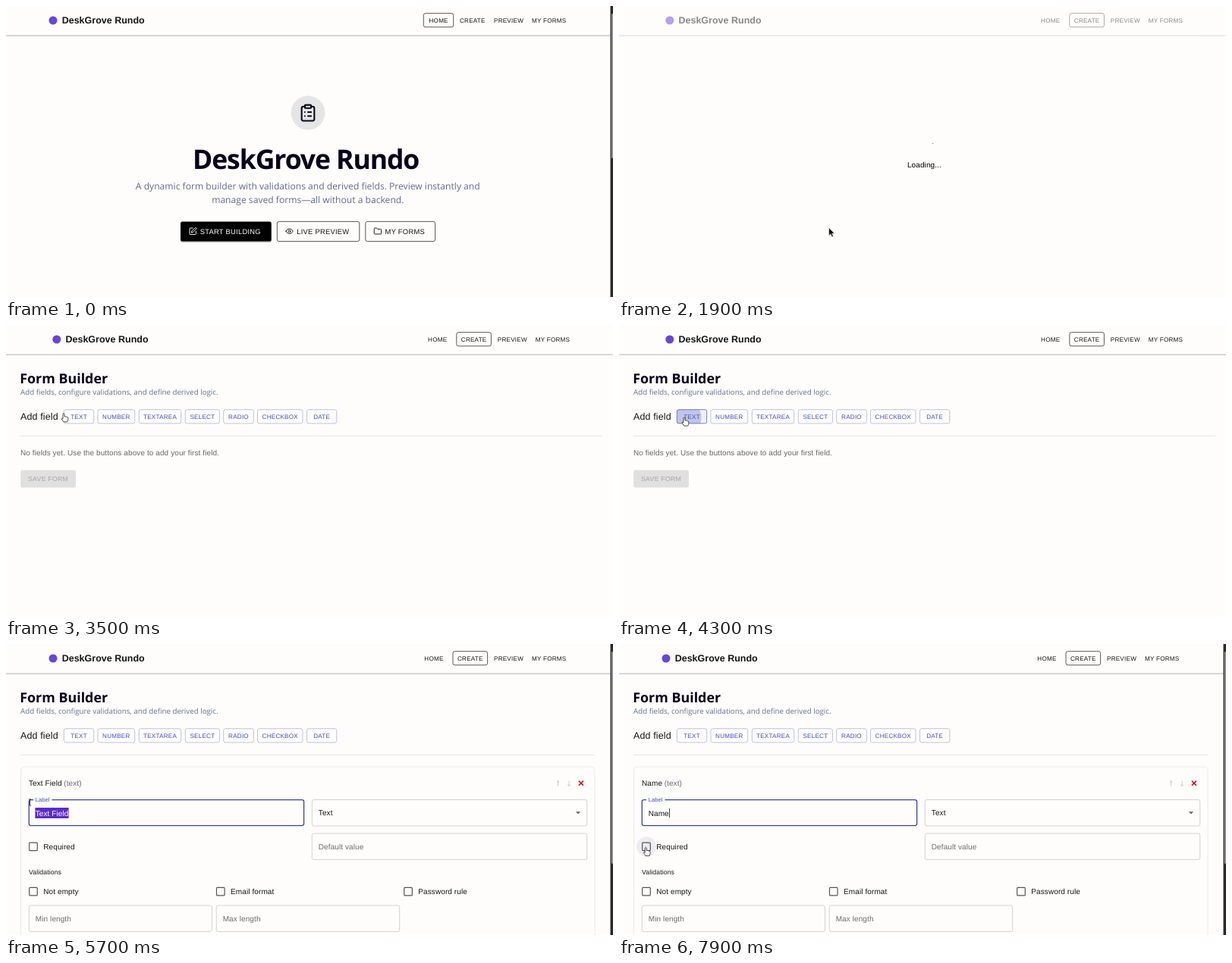
Recreate the animation shown at these times as an HTML page. Size 800 by 384 pixels, loop 8 s.

```html
<!DOCTYPE html>
<html lang="en">
<head>
<meta charset="utf-8">
<title>Form builder demo</title>
<style>
  html, body { margin: 0; height: 100%; overflow: hidden; background: #fefdfc; }
  svg { display: block; width: 800px; height: 384px; }
  text { font-family: "Liberation Sans", Arial, sans-serif; letter-spacing: .0094em; text-rendering: geometricPrecision; }
  .caps { letter-spacing: .0286em; }
  .brand { font-weight: bold; letter-spacing: 0; }
  .soft { font-family: "Open Sans", "Noto Sans", sans-serif; letter-spacing: 0; }
  .head { font-family: "Open Sans", "Noto Sans", sans-serif; font-weight: bold; letter-spacing: 0; }
  .hero { letter-spacing: -.03em; }
  .icon { fill: none; stroke-width: 2; stroke-linecap: round; stroke-linejoin: round; }
</style>
</head>
<body>
<svg id="stage" viewBox="0 0 800 384"></svg>
<script>
const LOOP = 8000, STEP = 100;
const NAME = 'DeskGrove Rundo';
const INK = '#151515', INDIGO = '#3f4fb8', GREY = '#6b6b6b';

// Drawing helpers
const text = (x, y, size, str, fill = INK, cls = '', anchor = 'start') =>
  `<text x="${x}" y="${y}" font-size="${size}" fill="${fill}" class="${cls}" text-anchor="${anchor}">${str}</text>`;
const box = (x1, y1, x2, y2, stroke, fill = 'none', width = .7, r = 2.5) =>
  `<rect x="${x1}" y="${y1}" width="${x2 - x1}" height="${y2 - y1}" rx="${r}" stroke="${stroke}" fill="${fill}" stroke-width="${width}"/>`;
const disc = (x, y, r, fill, extra = '') => `<circle cx="${x}" cy="${y}" r="${r}" fill="${fill}" ${extra}/>`;
const path = (d, stroke, width, fill = 'none') =>
  `<path d="${d}" stroke="${stroke}" stroke-width="${width}" fill="${fill}" stroke-linejoin="round"/>`;
const icon = (x, y, size, stroke, inner) =>
  `<g class="icon" stroke="${stroke}" transform="translate(${x} ${y}) scale(${size / 24})">${inner}</g>`;
const fade = (alpha, inner) => `<g opacity="${alpha}">${inner}</g>`;
const appear = (t, start, tau) => t >= 2700 ? 1 : Math.max(0, 1 - Math.exp((start - t) / tau));

const PEN = '<path d="M12 3H5a2 2 0 0 0-2 2v14a2 2 0 0 0 2 2h14a2 2 0 0 0 2-2v-7M18.4 2.6a2.1 2.1 0 0 1 3 3L12 15l-4 1 1-4Z"/>';
const EYE = '<path d="M2 12q3.5-7 10-7t10 7q-3.5 7-10 7t-10-7Z"/><circle cx="12" cy="12" r="3"/>';
const FOLDER = '<path d="M20 20a2 2 0 0 0 2-2V8a2 2 0 0 0-2-2h-7.9a2 2 0 0 1-1.7-.9L9.6 3.9A2 2 0 0 0 7.9 3H4a2 2 0 0 0-2 2v13a2 2 0 0 0 2 2Z"/>';
const CLIPBOARD = '<rect x="8" y="2" width="8" height="4" rx="1"/><path d="M16 4h2a2 2 0 0 1 2 2v14a2 2 0 0 1-2 2H6a2 2 0 0 1-2-2V6a2 2 0 0 1 2-2h2M12 11h4M12 16h4M8 11h.01M8 16h.01"/>';

function header(onHome, dx) {
  const nav = (x, str) => text(x, 21.5, 8.125, str, INK, 'caps');
  return `<rect y="38.6" width="800" height="1" fill="#b4b4b4"/><g transform="translate(${dx} 0)">` +
    disc(62, 19, 5.5, '#6a45dc') + text(73.7, 23, 12.5, NAME, INK, 'brand') +
    (onHome ? box(550.3, 9.7, 589.7, 27.8, INK) : box(589, 9.7, 634.6, 27.8, INK)) +
    nav(onHome ? 557.5 : 551.3, 'HOME') + nav(onHome ? 598 : 595, 'CREATE') +
    nav(643, 'PREVIEW') + nav(693, 'MY FORMS') + '</g>';
}

const scrollbar = end =>
  '<rect x="796.5" width="3.5" height="384" fill="#2a2a2a"/>' +
  `<rect x="797.8" y="10" width="2.2" height="${end - 10}" rx="1" fill="#8f8f8f"/>`;

function home(t, cursor) {
  const hover = over(cursor, 230, 284, 350, 311);
  const button = (x1, x2, tx, ix, str, glyph, dark) => {
    const ink = dark ? '#fff' : '#111';
    return box(x1, 284.4, x2, 310.6, dark ? 'none' : '#111', dark ? (hover ? '#3b3b3c' : '#000') : 'none') +
      icon(ix, 291.6, 11.25, ink, glyph) + text(tx, 300.6, 9.375, str, ink, 'caps');
  };
  return header(true, 0) + scrollbar(201) +
    disc(398, 141, 22.5, '#e5e5e5') + icon(385.5, 128.5, 25, '#0a0a1e', CLIPBOARD) +
    text(246, 215, 35.5, NAME, '#06011a', 'head hero') +
    text(397.8, 242, 12.12, 'A dynamic form builder with validations and derived fields. Preview instantly and', '#626a8a', 'soft', 'middle') +
    text(397.8, 259.6, 12.12, 'manage saved forms—all without a backend.', '#626a8a', 'soft', 'middle') +
    box(230, 286, 350, 312, 'none', hover ? '#0003' : '#0004') +
    button(230, 349.7, 255.7, 240.6, 'START BUILDING', PEN, true) +
    button(357.3, 465.8, 383.2, 367.9, 'LIVE PREVIEW', EYE) +
    button(473.8, 565.6, 499.6, 484.3, 'MY FORMS', FOLDER) +
    (t >= 1700 ? disc(277, 295, 22, '#fff', 'opacity=".2" clip-path="inset(0)"') : '');
}

function loading(t) {
  const p = Math.max(0, t - 1900) / 1400, q = Math.min(1, p * 2);
  const ease = q * q * (3 - 2 * q);
  return `<circle cx="402" cy="181" r="11.5" fill="none" stroke="${INDIGO}" stroke-width="2" ` +
    `stroke-dasharray="${.6 + 56 * ease} 114" stroke-dashoffset="${-8.5 * ease}" transform="rotate(${p * 360} 402 181)"/>` +
    text(402.4, 212.6, 10, 'Loading...', '#000', '', 'middle');
}

const KINDS = [['TEXT', 76.3, 115.7], ['NUMBER', 121, 169.7], ['TEXTAREA', 175.3, 230.7], ['SELECT', 236.3, 281.5],
  ['RADIO', 286.7, 326.3], ['CHECKBOX', 331.5, 391], ['DATE', 396.5, 435.8]];

function builder(t, cursor, right) {
  const buttons = KINDS.map(([str, x1, x2], i) => {
    const hover = !i && over(cursor, x1, 111, x2, 132);
    return box(x1, 111.7, x2, 129.9, hover ? INDIGO : '#a3aadb', hover ? '#3f4fb812' : 'none') +
      text((x1 + x2) / 2, 123.7, 8.125, str, INDIGO, 'caps', 'middle');
  }).join('');
  const ripple = t >= 4200 && t < 4400
    ? `<clipPath id="edge">${box(76.3, 111.7, 115.7, 129.9, 'none')}</clipPath>` +
      disc(86, 122, t < 4300 ? 11 : 22.5, INDIGO, 'opacity=".27" clip-path="url(#edge)"') : '';
  return text(18.2, 76.6, 17.9, 'Form Builder', '#06011a', 'head') +
    text(19, 92, 9.75, 'Add fields, configure validations, and define derived logic.', '#64708a', 'soft') +
    text(19, 125.4, 12.5, 'Add field') + buttons + ripple +
    `<rect x="19" y="145.8" width="${right - 19}" height=".8" fill="#dedede"/>`;
}

const empty = () =>
  text(19, 172, 10, 'No fields yet. Use the buttons above to add your first field.', '#666') +
  box(19.2, 191.5, 92, 214.4, 'none', '#e0e0e0') + text(55.6, 206, 8.75, 'SAVE FORM', '#a6a6a6', 'caps', 'middle');

function card(t) {
  const focus = t >= 5300, selected = t >= 5700 && t < 6300;
  const label = t < 6300 ? 'Text Field' : 'Name'.slice(0, t < 6500 ? 1 : Math.min(4, 2 + (t - 6500) / 100));
  const caret = focus && !selected && !(t >= 7300 && t < 7900);
  const caretX = t < 6300 ? 83 : 39 + [0, 7.3, 13, 21.4, 27][label.length];
  const input = (x1, y, x2, str, ink = GREY) => box(x1, y, x2, y + 34.6, '#c1c1c1') + text(x1 + 8.5, y + 20.8, 10, str, ink);
  const check = (x, y, str) => box(x - 5.3, y - 5.2, x + 5.3, y + 5.4, '#555', 'none', 1.2, 1) + text(x + 13.3, y + 3.6, 10, str);
  return box(19.5, 162, 776, 400, '#e2e2e2', 'none', .7, 5) +
    text(30, 187.3, 10, `${label}<tspan dx="2.6" fill="#666a78">(text)</tspan>`) +
    path('M727.5 187.5v-7m-1.8 2 1.8-2 1.8 2M742 180.5v7m-1.8-2 1.8 2 1.8-2', '#b5b5b5', .7) +
    path('M754.9 180.6l6 6m0-6-6 6', '#c8141c', 1.5) +
    box(30.3, 205.6, 392.6, 239.6, focus ? '#3640aa' : '#c1c1c1', 'none', focus ? 1.3 : .7) +
    '<rect x="36" y="203" width="24.5" height="5" fill="#fefdfc"/>' +
    text(38.8, 207.8, 7.5, 'Label', focus ? INDIGO : GREY) +
    (selected ? '<rect x="38.4" y="216" width="44.2" height="14" fill="#5c2cc8"/>' : '') +
    text(38.7, 226.5, 10, label, selected ? '#fff' : INK) +
    (caret ? `<rect x="${caretX}" y="217" width=".8" height="12" fill="#111"/>` : '') +
    input(403.3, 205.5, 765.7, 'Text', INK) + '<path d="M750.8 221.2h6.4l-3.2 3.2Z" fill="#666"/>' +
    input(403.3, 250, 765.7, 'Default value') +
    (t >= 7500 ? disc(36, 267.3, 13, '#ececf2') : '') + check(36, 267.3, 'Required') +
    text(30, 304, 8.75, 'Validations') +
    check(36, 326.5, 'Not empty') + check(282.8, 326.5, 'Email format') + check(530, 326.5, 'Password rule') +
    input(30.3, 345, 271.4, 'Min length') + input(277.2, 345, 518.7, 'Max length');
}

// Pointer: time, x, y
const TRACK = [[100, 400, 215], [900, 277, 292.5], [2900, 276, 292.5], [3000, 150, 165], [3100, 34, 76], [3200, 66, 111],
  [3300, 66, 111], [3700, 86, 121.5], [4400, 86, 121.5], [5000, 92, 223], [5600, 92, 223], [5700, 31.5, 209],
  [6000, 31.5, 215], [7000, 31.5, 215], [7500, 35.3, 268]];

function pointer(t) {
  if (t < 100 || (t >= 6300 && t < 7100)) return null;
  const i = TRACK.findIndex(k => k[0] > t);
  if (i < 0) return TRACK[TRACK.length - 1].slice(1);
  const [t0, x0, y0] = TRACK[i - 1], [t1, x1, y1] = TRACK[i], p = (t - t0) / (t1 - t0);
  return [x0 + (x1 - x0) * p, y0 + (y1 - y0) * p];
}

const over = (c, x1, y1, x2, y2) => !!c && c[0] >= x1 && c[0] <= x2 && c[1] >= y1 && c[1] <= y2;

const ARROW = path('M0 0V10.6L2.5 8.4 4.2 12.2 6 11.4 4.3 7.7H7.6Z', '#fff', .6, '#111');
const HAND = path('M-1 1Q0-.8 1 1V4.6Q2 3.8 2.8 4.8 3.8 4.2 4.4 5.2 5.8 5 5.8 6.5V8.5Q5.6 10 4.8 11.6H-.2Q-1.6 9.4-3 7.4-2.6 5.8-1 7.4Z', '#222', .8, '#fff');
const BEAM = path('M-1.6-4.4Q0-4.4 0-3.4V3.4Q0 4.4-1.6 4.4M1.6-4.4Q0-4.4 0-3.4M0 3.4Q0 4.4 1.6 4.4', '#333', 1);

function cursorArt(t, c) {
  if (!c) return '';
  const hand = t < 1800 ? over(c, 230, 284, 350, 311)
    : t < 4400 ? over(c, 76, 111, 116, 131) : over(c, 30, 255, 92, 280);
  const beam = t < 1800 ? over(c, 170, 185, 625, 264) : t >= 4400 && over(c, 30, 205, 393, 240);
  return `<g transform="translate(${c[0]} ${c[1]})">${hand ? HAND : beam ? BEAM : ARROW}</g>`;
}

function scene(t) {
  const c = pointer(t);
  let page;
  if (t < 1800) page = home(t, c);
  else if (t < 4400) {
    page = fade(appear(t, 1740, 231), header(false, 4.8));
    if (t >= 2200) page += fade(appear(t, 2140, 150), builder(t, c, 786) + empty());
    else if (t >= 1900) page += loading(t);
  } else page = header(false, 0) + builder(t, c, 776) + card(t) + scrollbar(290);
  return page + cursorArt(t, c);
}

const stage = document.getElementById('stage');
let shown = -1;
function tick(now) {
  const t = Math.floor(now % LOOP / STEP) * STEP;
  if (t !== shown) stage.innerHTML = scene(shown = t);
  requestAnimationFrame(tick);
}
tick(0);
</script>
</body>
</html>
```
